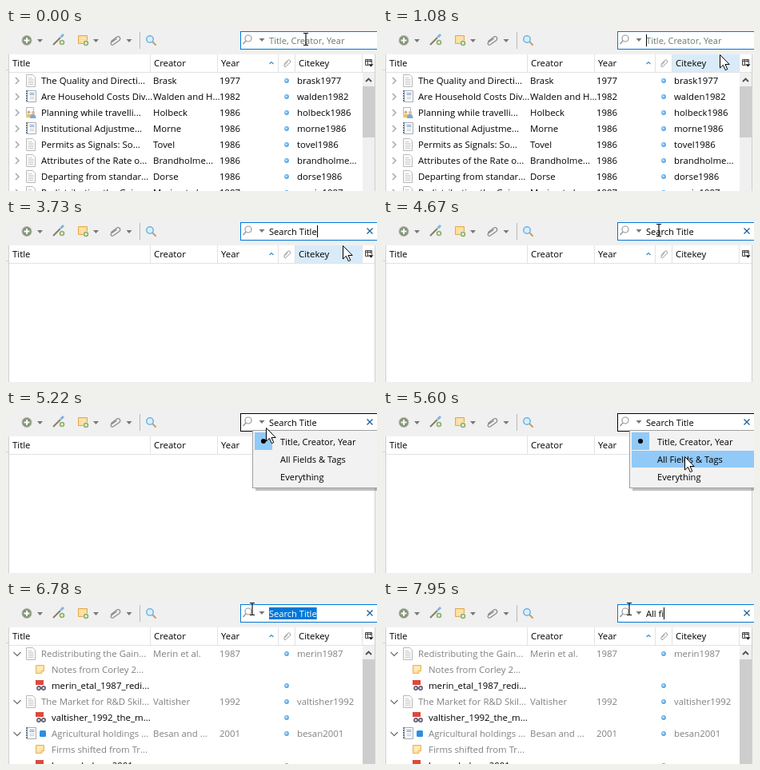
An HTML page for the animation above (8 s loop, 464 px wide and 204 px high).

```html
<!DOCTYPE html>
<html lang="en">
<head>
<meta charset="utf-8">
<title>Library search</title>
<style>
html, body { margin: 0; width: 100%; height: 100%; overflow: hidden; background: #f0f0f0; }
svg { display: block; width: 464px; height: 204px; }
text { font: 11.4px "Open Sans", "Noto Sans", sans-serif; fill: #000; white-space: pre; }
.field, .menu text { font-size: 11.1px; }
.dim { fill: #808080; }
.hint { fill: #6a7a70; }
</style>
</head>
<body>
<svg viewBox="0 0 464 204" xmlns="http://www.w3.org/2000/svg">
  <defs>
    <path id="drop" d="M-3.5-2h7L0 2z" fill="#777"/>
    <path id="clip" d="M-3.5 1.5 1.5-4a2.3 2.3 0 0 1 3.4 3.1L-1 5a1.6 1.6 0 0 1-2.3-2.2L1.6-2" fill="none" stroke="#8a8a8a" stroke-width="1.1" stroke-linecap="round"/>
    <g id="plus">
      <circle r="3.6" fill="#7fa55c" stroke="#fff" stroke-width=".6"/>
      <path d="M-2 0h4M0-2v4" stroke="#fff" stroke-width="1.2"/>
    </g>
    <g id="article">
      <path d="M-5.5-7.5h8l3 3v12h-11z" fill="#fff" stroke="#b8b8b8"/>
      <path d="M-3.5-3.5h5M-3.5-1.5h7M-3.5.5h7M-3.5 2.5h7M-3.5 4.5h7" stroke="#cacaca"/>
    </g>
    <g id="book">
      <path d="M-4.5-7.5h11v14h-11z" fill="#fff" stroke="#a3abb5"/>
      <path d="M-5-8v15" stroke="#66768a" stroke-width="2" stroke-dasharray="2 1"/>
      <path d="M-1.5-4.5h6M-1.5-2.5h6" stroke="#7d93b0"/>
      <path d="M-1.5.5h6M-1.5 2.5h6" stroke="#c2c8d0"/>
    </g>
    <g id="talk">
      <path d="M-5.5-6.5h9v9h-9z" fill="#fff" stroke="#b5b5b5"/>
      <circle cx="-2.5" cy="-.5" r="2" fill="#d9b27c"/><circle cx="3" cy="0" r="2.2" fill="#e5bd8c"/>
      <path d="M-6 6q0-4 3.5-4T1 6z" fill="#e9c75e"/><path d="M-1 7q0-5 3.800-5T6.500 7z" fill="#7fa9d6"/>
    </g>
    <g id="note">
      <path d="M-4.5-5.500h10v7l-3 3h-7z" fill="#fce2a4" stroke="#e8b35c"/>
      <path d="M-2.500-2.500h6M-2.500 0h5" stroke="#fff6de"/>
      <path d="M5.500 1.500h-3v3" fill="#fff" stroke="#e8b35c"/>
    </g>
    <g id="file">
      <rect x="-5" y="-7" width="10" height="6" fill="#dc4a3c"/>
      <g fill="#d9d5e2" stroke="#5c5069" stroke-width="1.4"><circle cx="-1" cy="3" r="2.200"/><circle cx="5" cy="3" r="2.200"/><path d="M1 3h2"/></g>
    </g>
    <g id="dot"><circle r="2.900" fill="#5ca8e6"/><circle cx="-.4" cy="-.5" r="1.600" fill="#b5dcfa"/></g>
    <clipPath id="selClip"><rect id="selBox" y="8" width="0" height="15"/></clipPath>
  </defs>

  <rect width="464" height="204" fill="#f0f0f0"/>
  <g id="tools">
    <circle cx="26" cy="15.500" r="6" fill="#85957a" stroke="#b3bca9"/>
    <path d="M22.500 15.500h7M26 12v7" stroke="#fff" stroke-width="2"/>
    <use href="#drop" x="42.500" y="16"/>
    <path d="M59 21 68 12" stroke="#8a7a66" stroke-width="2"/>
    <path d="M68.500 11.500 72 8" stroke="#7db4e4" stroke-width="3"/>
    <use href="#plus" x="70" y="18"/>
    <path d="M90.500 9.500h11v10h-11z" fill="#fcdc98" stroke="#e3a94c"/>
    <path d="M93 13h6M93 16h4" stroke="#fff0c8"/>
    <use href="#plus" x="100" y="19"/>
    <use href="#drop" x="112.500" y="16"/>
    <use href="#clip" transform="translate(136 15.500) rotate(10) scale(1.150)"/>
    <use href="#drop" x="154" y="16"/>
    <path d="M167.500 5v21" stroke="#b8b8b8"/>
    <path d="M183 17l4 4" stroke="#c9a06e" stroke-width="2.200" stroke-linecap="round"/>
    <circle cx="180" cy="14" r="4.200" fill="#d8effd" stroke="#6db4e2" stroke-width="1.500"/>
  </g>

  <rect x="3" y="33" width="459" height="171" fill="#fff"/>
  <path d="M3.500 33v171M461.500 33v171" stroke="#d0d0d0"/>
  <path d="M0 52.500h3" stroke="#d0d0d0"/>
  <rect id="hover" x="362" y="33" width="84" height="22" fill="#d9ebf9"/>
  <path d="M180.500 33v22M264.500 33v22M340.500 33v22M361.500 33v22M445.500 33v22M4 55.500h457" stroke="#e2e2e2"/>
  <text x="8" y="48">Title</text><text x="185" y="48">Creator</text>
  <text x="269" y="48">Year</text><text x="366" y="48">Citekey</text>
  <path d="M329.500 45l2.500-2.500 2.500 2.500" fill="none" stroke="#3a8fc0" stroke-width="1.200"/>
  <use href="#clip" transform="translate(351 44) scale(.85)"/>
  <path d="M449.500 39.500h8v7h-8zM449 41.500h9M452.500 40v6M455.500 40v3" fill="none" stroke="#444"/>
  <path d="M453 45h7l-3.500 4z" fill="#111" stroke="#fff" stroke-width=".6"/>

  <g id="full"></g>
  <g id="found"></g>

  <g id="spinner"></g>
  <rect id="frame" x="293.500" y="4.500" width="180" height="22" fill="#fff"/>
  <path d="M300 16l-3.500 4" stroke="#999" stroke-width="1.500"/>
  <circle cx="303" cy="13" r="4" fill="#fff" stroke="#999" stroke-width="1.200"/>
  <use href="#drop" x="320" y="15"/>
  <text id="hint" class="field hint" x="329" y="19.500">Title, Creator, Year</text>
  <text id="typed" class="field" x="329" y="19.500"></text>
  <rect id="selBack" y="8" height="15" fill="#0078d7"/>
  <text id="selText" class="field" x="329" y="19.500" style="fill:#fff" clip-path="url(#selClip)"></text>
  <rect id="caret" y="8" width="1" height="15"/>
  <path id="clear" d="M451.500 11.500l7 7M458.500 11.500l-7 7" stroke="#1f5f96" stroke-width="1.300"/>

  <g id="menu" class="menu">
    <path d="M312 99.500h152" stroke="#000" stroke-opacity=".25" stroke-width="3"/>
    <rect x="308.500" y="25.500" width="165" height="72" fill="#f2f2f2" stroke="#a0a0a0"/>
    <rect id="pick" x="311" width="153" height="21" fill="#91c9f7"/>
    <g id="mark"><rect x="311" y="-11" width="22" height="22" fill="#91c9f7"/><circle cx="322" r="3"/></g>
    <text x="343" y="44">Title, Creator, Year</text>
    <text x="343" y="66">All Fields &amp; Tags</text>
    <text x="343" y="88">Everything</text>
  </g>

  <path id="arrow" d="M-.5.500v16.500l3.900-3.600 2.900 6.300 2.500-1.100-2.800-6.100h5.200z" fill="#fff" stroke="#000"/>
  <path id="beam" d="M-3-7.500h2.200l.8.800.8-.8H3M0-7V7M-3 7.500h2.200l.8-.8.8.8H3" fill="none" stroke="#000" stroke-width="1.100"/>
</svg>
<script>
const LOOP = 8000, TEXT_X = 329;
const $ = id => document.getElementById(id);
const show = (id, on) => $(id).setAttribute('visibility', on ? 'visible' : 'hidden');
const put = (id, attrs) => { for (const k in attrs) $(id).setAttribute(k, attrs[k]); };
const label = (x, y, s, cls = '') => s ? `<text x="${x}" y="${y}" class="${cls}">${s}</text>` : '';
const icon = (name, x, y) => `<use href="#${name}" x="${x}" y="${y}"/>`;

const chevron = (y, open) =>
  `<path d="${open ? `M9.500 ${y - 2}l4.500 4.500 4.500-4.500` : `M12 ${y - 4}l4 4-4 4`}" fill="none" stroke="${open ? '#777' : '#a0a0a0'}" stroke-width="1.300"/>`;

const scrollbar = h => `<rect x="446" y="56" width="15" height="148" fill="#f0f0f0"/>
  <path d="M450 67l3.500-3.500 3.500 3.500" fill="none" stroke="#505050" stroke-width="1.900"/>
  <rect x="446" y="73" width="15" height="${h}" fill="#cdcdcd"/>`;

const cells = (y, [who, year, key], cls) => label(184, y + 4, who, cls) + label(267, y + 4, year, cls) +
  icon('dot', 351, y) + label(364, y + 4, key, cls);

const all = [
  ['article', 'The Quality and Directi...', 'Brask', 1977, 'brask1977'],
  ['book', 'Are Household Costs Div...', 'Walden and H...', 1982, 'walden1982'],
  ['talk', 'Planning while travelli...', 'Holbeck', 1986, 'holbeck1986'],
  ['book', 'Institutional Adjustme...', 'Morne', 1986, 'morne1986'],
  ['article', 'Permits as Signals: So...', 'Tovel', 1986, 'tovel1986'],
  ['article', 'Attributes of the Rate o...', 'Brandholme...', 1986, 'brandholme...'],
  ['article', 'Departing from standar...', 'Dorse', 1986, 'dorse1986'],
  ['article', 'Redistributing the Gain...', 'Merin et al.', 1987, 'merin1987']
];
$('full').innerHTML = scrollbar(64) + all.map(([kind, title, ...rest], i) => {
  const y = 66 + 20 * i;
  return chevron(y, false) + icon(kind, 31, y) + label(44, y + 4, title) + cells(y, rest);
}).join('');

const hits = [
  ['article', 'Redistributing the Gain...', 'Merin et al.', 1987, 'merin1987'],
  ['note', 'Notes from Corley 2...'],
  ['file', 'merin_etal_1987_redi...'],
  ['article', 'The Market for R&amp;D Skil...', 'Valtisher', 1992, 'valtisher1992'],
  ['file', 'valtisher_1992_the_m...'],
  ['book', 'Agricultural holdings ...', 'Besan and ...', 2001, 'besan2001'],
  ['note', 'Firms shifted from Tr...'],
  ['file', 'besan_halvor_2001_...']
];
$('found').innerHTML = scrollbar(131) + hits.map(([kind, title, ...rest], i) => {
  const y = 66 + 20 * i, child = !rest.length, tagged = kind === 'book';
  return icon(kind, child ? 42 : 31, y) +
    (tagged ? `<rect x="42" y="${y - 4}" width="8" height="8" rx="1.500" fill="#2f8fe0"/>` : '') +
    label(child || tagged ? 57 : 44, y + 4, title, kind === 'file' ? '' : 'dim') +
    (child ? (kind === 'file' ? icon('dot', 351, y) : '') : chevron(y, true) + cells(y, rest, 'dim'));
}).join('');

$('spinner').innerHTML = Array.from({ length: 12 }, (_, i) =>
  `<path d="M0-3v-3" stroke="#444" stroke-width="1.300" stroke-opacity="${.2 + i * .06}" transform="rotate(${i * 30})"/>`).join('');

// Keystroke times, one per character
const first = 'Search Title', second = 'All fi';
const keys1 = [1310, 1540, 1620, 1770, 1940, 2090, 2250, 2480, 2630, 2710, 2860, 3010];
const keys2 = [7240, 7410, 7650, 7730, 7800, 7950];
const count = (keys, t) => keys.filter(k => k <= t).length;

// Pointer stops: time, x, y, 1 for the text beam
const stops = [
  [0, 375, 14, 1], [70, 384, 16, 1], [150, 404, 22, 1], [220, 417, 32], [300, 422, 33],
  [4350, 405, 23, 1], [4520, 385, 18, 1], [4600, 364, 15, 1], [4670, 345, 14, 1], [4750, 330, 14],
  [4820, 322, 14], [4970, 321, 16], [5220, 326, 22], [5300, 334, 30], [5370, 345, 40],
  [5450, 358, 48], [5530, 370, 55], [5600, 378, 58], [5920, 398, 30], [6000, 408, 22, 1],
  [6070, 414, 19, 1], [6320, 405, 17, 1], [6400, 386, 15, 1], [6470, 364, 13, 1],
  [6550, 346, 12, 1], [6630, 331, 11, 1], [6700, 317, 10, 1], [6780, 308, 10, 1]
];
const within = (t, ...spans) => spans.some(([a, b]) => t >= a && t < b);

function edge(n) {
  return TEXT_X + (n ? $('typed').getSubStringLength(0, n) : 0);
}

function draw(t) {
  const [, x, y, beam] = stops.filter(s => s[0] <= t).pop();
  put('arrow', { transform: `translate(${x} ${y})` });
  put('beam', { transform: `translate(${x} ${y})` });
  show('arrow', !beam);
  show('beam', beam);
  show('hover', within(t, [220, 4350]));

  const text = t < 7240 ? first.slice(0, count(keys1, t)) : second.slice(0, count(keys2, t));
  if ($('typed').textContent !== text) $('typed').textContent = $('selText').textContent = text;
  show('hint', !text);
  show('clear', text);

  put('frame', { stroke: within(t, [4820, 6320]) ? '#000' : '#0078d7' });
  show('caret', within(t, [70, 530], [1080, 3250], [3730, 4280], [7240, LOOP]));
  put('caret', { x: Math.round(edge(text.length)) });

  let from = text.length;
  if (within(t, [6400, 7240])) while (from && (edge(from) + edge(from - 1)) / 2 > x) from--;
  const left = edge(from), width = edge(text.length) - left;
  put('selBack', { x: left, width });
  put('selBox', { x: left, width });

  show('menu', within(t, [4820, 5920]));
  const chosen = t < 5770 ? 0 : 1;
  put('mark', { transform: `translate(0 ${39 + 22 * chosen})` });
  const over = within(t, [5300, 5530]) ? 0 : within(t, [5530, 5770]) ? 1 : -1;
  put('pick', { y: 29 + 22 * over, 'fill-opacity': over < 0 ? 0 : 1 });

  show('full', t < 3180);
  show('found', t >= 6150);
  show('spinner', within(t, [5920, 6150]));
  put('spinner', { transform: `translate(282.5 14.5) rotate(${Math.floor((t - 6070) / 75) * 30})` });
}

function tick() {
  draw(performance.now() % LOOP);
  requestAnimationFrame(tick);
}
tick();
</script>
</body>
</html>
```
